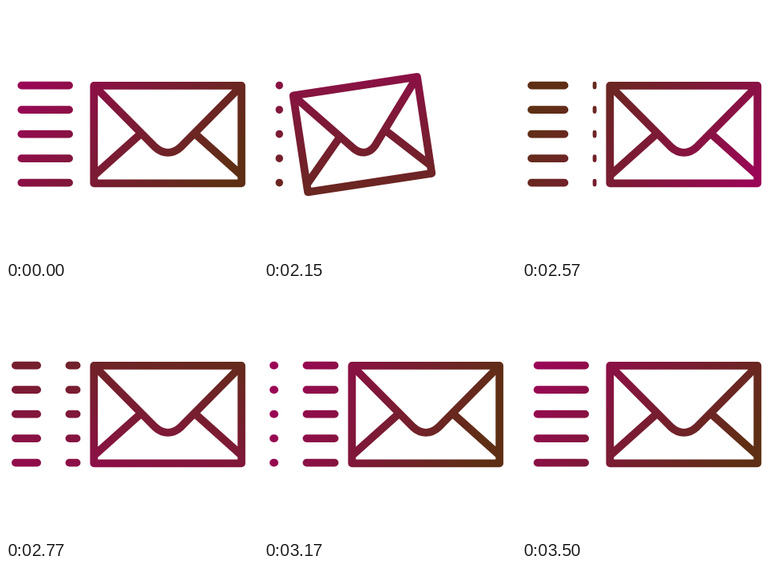
Animation of 316x316 px, one loop 3.52 s. Source, as an HTML page with a canvas:

```html
<!DOCTYPE html>
<html lang="en">
<head>
<meta charset="utf-8">
<title>Sending mail</title>
<style>
  html, body { margin: 0; width: 100%; height: 100%; overflow: hidden; background: #fff; }
  canvas { display: block; width: 100vmin; height: 100vmin; }
</style>
</head>
<body>
<canvas id="stage" width="316" height="316"></canvas>
<script>
const ctx = document.getElementById("stage").getContext("2d");
const SIZE = 316, LOOP = 3520, START = 2020, SETTLED = 3500;
const THICK = 9.8, DASH = 69.5, PERIOD = 100, DASH_REST = 14.5;
const TRACK = { left: 7, right: 93.5 };
const ROWS = [0, 1, 2, 3, 4].map(i => 99.6 + 30.5 * i);
const CENTER = { x: 202.9, y: 161 };

// Gradient direction in degrees over time
const ANGLES = [[2020, 50], [2420, 168], [2770, 285], [3020, 362], [3300, 395], [3500, 398]];

const envelope = new Path2D(
  "M110.3 99.9H295.3V222.3H110.3Z" +
  "M110.3 99.9L187 177C197 186 209 186 219 177L295.3 99.9" +
  "M111 212L168 161M295 212L238 161");

const clamp = v => Math.min(1, Math.max(0, v));
const smooth = v => v * v * (3 - 2 * v);
const isResting = t => t < START || t >= SETTLED;

function gradientAngle(t) {
  if (isResting(t)) return 38;
  const i = ANGLES.findIndex(([time]) => time > t);
  const [t0, a0] = ANGLES[i - 1], [t1, a1] = ANGLES[i];
  return a0 + (a1 - a0) * (t - t0) / (t1 - t0);
}

// 0 at rest, 1 when fully drawn back to the left
function pullAmount(t) {
  if (isResting(t)) return 0;
  if (t < 2380) {
    const left = 1 - clamp((t - START) / 250);
    return 1 - 0.6 * left * left;
  }
  return 1 - smooth(clamp((t - 2380) / 190));
}

function drawDash(from, to) {
  if (to - from < 2) return;
  for (const y of ROWS) ctx.roundRect(from, y - THICK / 2, to - from, THICK, THICK / 2);
}

function drawLines(t, pull) {
  ctx.beginPath();
  if (isResting(t)) {
    drawDash(DASH_REST, DASH_REST + DASH);
  } else if (t < 2380) {
    drawDash(DASH_REST, DASH_REST + DASH * (1 - pull));
  } else if (t > 2430) {
    const travel = 461 * ((LOOP - t) / 750) ** 1.615;
    const right = TRACK.right - DASH * pull;
    const first = (DASH_REST + travel) % PERIOD - PERIOD;
    for (let x = first; x < right; x += PERIOD) {
      drawDash(Math.max(x, TRACK.left), Math.min(x + DASH, right));
    }
  }
  ctx.fill();
}

// The path is transformed before stroking, so its line weight stays constant
function drawEnvelope(pull) {
  const pose = new DOMMatrix()
    .translate(CENTER.x - 91.8 * pull, CENTER.y)
    .rotate(-10 * pull)
    .scale(1 - 0.175 * pull, 1)
    .translate(-CENTER.x, -CENTER.y);
  const posed = new Path2D();
  posed.addPath(envelope, pose);
  ctx.lineWidth = THICK;
  ctx.lineCap = ctx.lineJoin = "round";
  ctx.stroke(posed);
}

function fillStage(mode, style) {
  ctx.globalCompositeOperation = mode;
  ctx.fillStyle = style;
  ctx.fillRect(0, 0, SIZE, SIZE);
  ctx.globalCompositeOperation = "source-over";
}

function tint(t) {
  const a = gradientAngle(t) * Math.PI / 180, mid = SIZE / 2;
  const dx = Math.cos(a), dy = Math.sin(a);
  const paint = ctx.createLinearGradient(mid - 140 * dx, mid - 140 * dy, mid + 125 * dx, mid + 125 * dy);
  paint.addColorStop(0, "#9a0656");
  paint.addColorStop(1, "#5e2f14");
  fillStage("source-in", paint);
}

function frame(now) {
  const t = now % LOOP;
  const pull = pullAmount(t);
  ctx.clearRect(0, 0, SIZE, SIZE);
  drawLines(t, pull);
  drawEnvelope(pull);
  tint(t);
  fillStage("destination-over", "#fff");
}

const began = performance.now();
function tick() {
  frame(performance.now() - began);
  requestAnimationFrame(tick);
}
tick();
</script>
</body>
</html>
```
